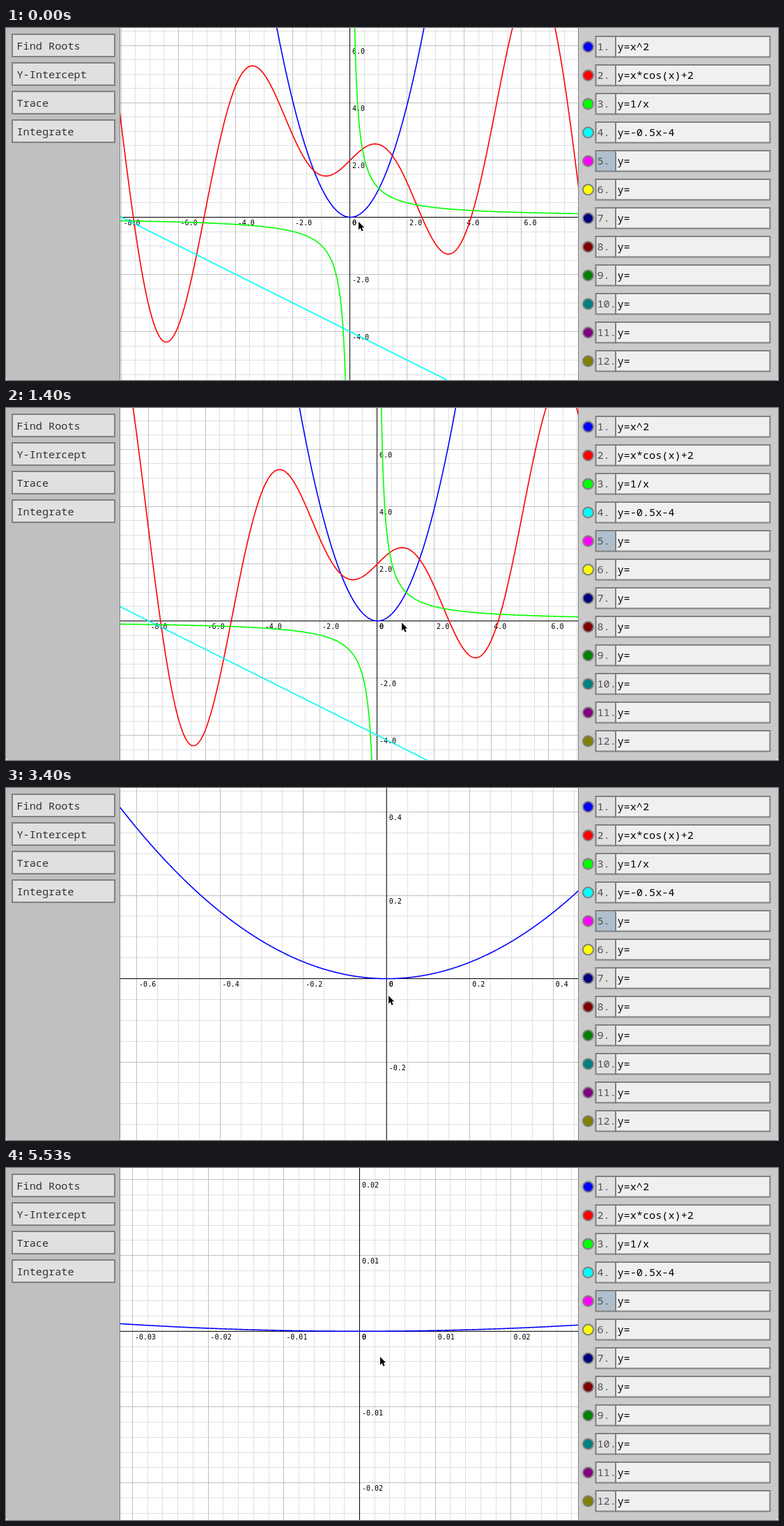
Recreate the animation shown at these times as an HTML page. Size 1108 by 505 pixels, loop 6190 ms.

```html
<!DOCTYPE html>
<html lang="en">
<head>
<meta charset="utf-8">
<title>Graphing calculator</title>
<style>
html, body { margin: 0; width: 100%; height: 100%; overflow: hidden; background: #fff; }
svg { display: block; width: 100%; height: 100%; }
text { font-family: "Noto Sans Mono", "DejaVu Sans Mono", monospace; white-space: pre; }
.ui { font-size: 15.2px; }
.box { stroke: #808080; stroke-width: 2; }
#labels text { font: 10px "DejaVu Sans Mono", monospace; }
#curves path { fill: none; stroke-width: 1.6; stroke-linejoin: round; }
</style>
</head>
<body>
<svg id="stage" viewBox="0 0 1108 505">
  <rect width="1108" height="505" fill="#fff"/>
  <path id="minor" stroke="#e0e0e0" fill="none"/>
  <path id="major" stroke="#c0c0c0" fill="none"/>
  <path id="axes" stroke="#000" fill="none"/>
  <g id="labels"></g>
  <g id="curves" transform="translate(.8 0)"></g>
  <g id="panels"></g>
  <path id="cursor" d="M0 0V11.4L2.6 9L4.6 13.4L6.6 12.5L4.7 8.2H8.2Z" stroke="#fff" stroke-width=".7" paint-order="stroke"/>
</svg>
<script>
const LEFT = 164, RIGHT = 821, BOTTOM = 505;
const LOOP = 6190, TICK = 200 / 3;
const BASE = (RIGHT - LEFT) / 16, ZOOM = 1.25;
const $ = id => document.getElementById(id);

// Spans of steps in which the user drags or zooms; the view rests between them.
const spans = [[3, 30], [33, 53], [55, 70], [74, 77], [81, 83]];

// Key poses by step: origin x y, cursor x y, wheel clicks so far.
const keys = [
  { step: 2, pose: [493.5, 271.5, 506, 278, 0] },
  { step: 12, pose: [538, 257, 542, 262, 0] },
  { step: 21, pose: [532.5, 305.5, 568, 308, 0] },
  { step: 27, pose: [548.5, 264.5, 560, 270, 0] },
  { step: 30, pose: [566.5, 274.5, 578, 281, 0] },
  { step: 41, pose: [577.5, 277.5, 594, 295, 7] },
  { step: 61, pose: [519.4, 267, 511, 299, 17] },
  { step: 70, pose: [527.3, 258.5, 537, 271, 20] },
  { step: 83, pose: [507.5, 234.3, 537, 271, 25] }
];

const plots = [
  ["#00f", x => x * x],
  ["#f00", x => x * Math.cos(x) + 2],
  ["#0f0", x => 1 / x],
  ["#0ff", x => -0.5 * x - 4]
];

// Number of active steps up to and including this one.
const active = step => spans.reduce(
  (sum, [a, b]) => sum + Math.max(0, Math.min(step, b) - a + 1), 0);

keys.forEach(k => k.at = active(k.step));

const slope = (i, c) => (keys[i + 1].pose[c] - keys[i].pose[c]) / (keys[i + 1].at - keys[i].at);

// Tangent that never overshoots its neighbours.
function tangent(i, c) {
  if (i === 0 || i === keys.length - 1) return 0;
  const a = slope(i - 1, c), b = slope(i, c);
  return a * b > 0 ? 2 * a * b / (a + b) : 0;
}

function poseAt(step) {
  const t = active(step);
  const i = Math.max(0, keys.findLastIndex((k, n) => k.at <= t && n < keys.length - 1));
  const a = keys[i], b = keys[i + 1], span = b.at - a.at;
  const u = (t - a.at) / span, v = 1 - u;
  const mix = c => a.pose[c] * v * v * (1 + 2 * u) + b.pose[c] * u * u * (1 + 2 * v)
    + span * u * v * (tangent(i, c) * v - tangent(i + 1, c) * u);
  const [ox, oy, cx, cy] = [0, 1, 2, 3].map(mix);
  const clicks = Math.round(a.pose[4] + (b.pose[4] - a.pose[4]) * u);
  return { ox, oy, cx, cy, scale: BASE * ZOOM ** clicks };
}

// Smallest 1-2-5 step that keeps the major lines well apart.
function gridStep(scale) {
  const min = 65 / scale;
  const pow = 10 ** Math.floor(Math.log10(min));
  const m = [1, 2, 5, 10].find(v => v * pow >= min);
  return { size: m * pow, parts: m === 2 ? 4 : 5 };
}

const crisp = v => Math.floor(v + 1e-6) + 0.5;
const vLine = x => `M${x} 0V${BOTTOM}`;
const hLine = y => `M${LEFT} ${y}H${RIGHT}`;

function lines(ox, oy, gap) {
  let d = "";
  for (let i = Math.ceil((LEFT - ox) / gap); ox + i * gap < RIGHT; i++) d += vLine(crisp(ox + i * gap));
  for (let i = Math.ceil(-oy / gap); oy + i * gap < BOTTOM; i++) d += hLine(crisp(oy + i * gap));
  return d;
}

function format(v) {
  const r = +v.toFixed(10);
  if (r === 0) return "0";
  return Number.isInteger(r) ? r.toFixed(1) : String(r);
}

function labels(ox, oy, gap, size) {
  let s = "";
  const put = (x, y, v) => { s += `<text x="${x.toFixed(1)}" y="${y.toFixed(1)}">${format(v)}</text>`; };
  for (let i = Math.floor((LEFT - ox) / gap); ox + i * gap < RIGHT; i++) put(ox + i * gap + 3.5, oy + 11.5, i * size);
  for (let i = Math.floor(-oy / gap); oy + i * gap < BOTTOM; i++) put(ox + 3.5, Math.min(oy + i * gap + 11.5, 502), -i * size);
  return s;
}

function curve(f, { ox, oy, scale }) {
  let d = "", pen = false, prev = 0;
  for (let px = LEFT - 2; px <= RIGHT + 1; px += 0.5) {
    const x = (px + 0.01 - ox) / scale;
    const y = oy - f(x) * scale;
    const seen = Math.abs(y) < 3000;
    const join = pen && Math.abs(y - prev) < 3000;
    if (seen) d += `${join ? "L" : "M"}${px} ${y.toFixed(2)}`;
    pen = seen;
    prev = y;
  }
  return d;
}

function buildPanels() {
  const box = (x, y, w, h, fill) =>
    `<rect class="box" x="${x}" y="${y}" width="${w}" height="${h}" fill="${fill}"/>`;
  const text = (x, y, fill, s) => `<text class="ui" x="${x}" y="${y}" fill="${fill}">${s}</text>`;
  let s = `<path d="M0 0H163V505H4Q0 505 0 501Z" fill="#c0c0c0"/>
    <path d="M822 0H1108V501Q1108 505 1104 505H822Z" fill="#cacaca"/>
    <path d="M163.5 0V505M821.5 0V505" stroke="#808080"/>`;
  ["Find Roots", "Y-Intercept", "Trace", "Integrate"].forEach((name, i) => {
    const y = 41 * i;
    s += box(9, y + 9, 147, 32, "#e0e0e0") + text(15.5, y + 30.5, "#333", name);
  });
  const colors = ["#00f", "#f00", "#0f0", "#0ff", "#f0f", "#ff0",
    "#000080", "#800000", "#008000", "#008080", "#800080", "#808000"];
  const formulas = ["x^2", "x*cos(x)+2", "1/x", "-0.5x-4"];
  colors.forEach((color, i) => {
    const y = 41 * i;
    s += `<circle class="box" cx="835.5" cy="${y + 27}" r="7.5" fill="${color}"/>`
      + box(846.5, y + 12, 28.5, 29.5, i === 4 ? "#b0bfcc" : "#e0e0e0")
      + box(875, y + 12, 221.5, 29.5, "#f0f0f0")
      + text(848.5, y + 32, "#505050", i + 1 + ".")
      + text(877.5, y + 32, "#000", "y=" + (formulas[i] || ""));
  });
  $("panels").innerHTML = s;
  $("curves").innerHTML = plots.map(([c]) => `<path stroke="${c}"/>`).join("");
}

function draw(step) {
  const pose = poseAt(step), { ox, oy, cx, cy, scale } = pose;
  const { size, parts } = gridStep(scale), gap = size * scale;
  $("minor").setAttribute("d", lines(ox, oy, gap / parts));
  $("major").setAttribute("d", lines(ox, oy, gap));
  $("axes").setAttribute("d", vLine(ox) + hLine(oy));
  $("labels").innerHTML = labels(ox, oy, gap, size);
  plots.forEach(([, f], i) => $("curves").children[i].setAttribute("d", curve(f, pose)));
  $("cursor").setAttribute("transform", `translate(${Math.round(cx)} ${Math.round(cy)})`);
}

let shown = -1;
const start = performance.now();
function frame() {
  const t = (performance.now() - start) % LOOP;
  const step = Math.floor((t + 3.4) / TICK);
  if (step !== shown) draw(shown = step);
  requestAnimationFrame(frame);
}

buildPanels();
frame();
</script>
</body>
</html>
```
